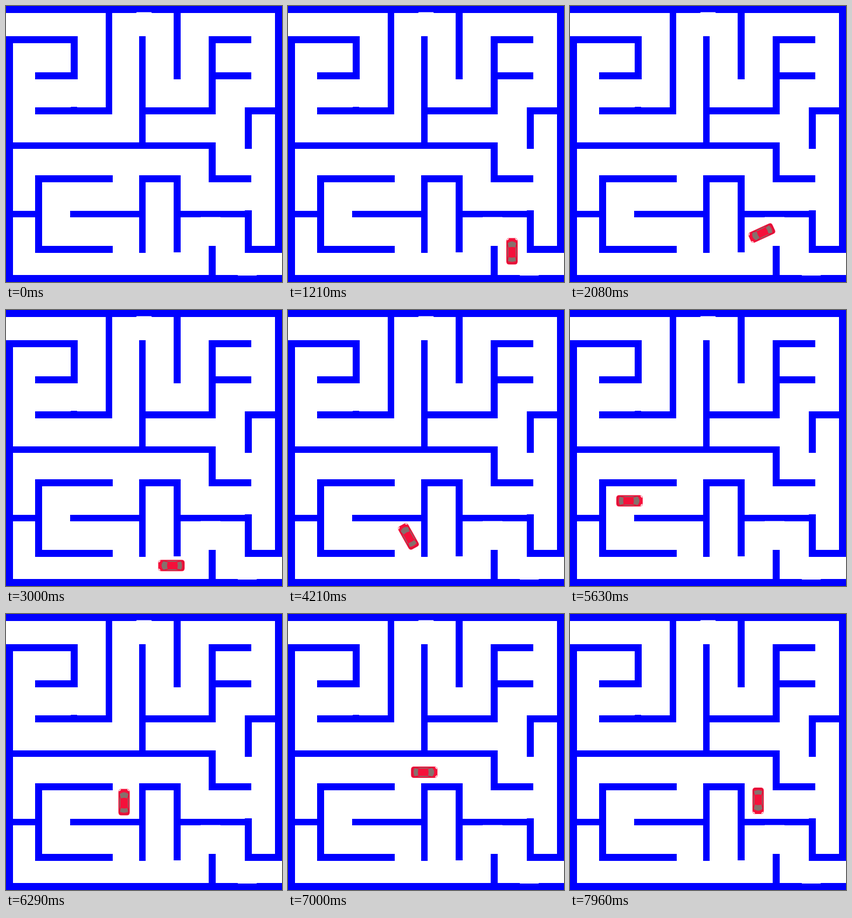
An HTML page without scripts that plays this animation: 512 by 512 pixels, repeating every 8 s.

```html
<!DOCTYPE html>
<html lang="en">
<head>
<meta charset="utf-8">
<title>Car in a maze</title>
<style>
html, body { margin: 0; width: 100%; height: 100%; overflow: hidden; background: #fff; }
svg { display: block; width: 100vw; height: 100vh; }
.walls { fill: none; stroke: #00f; stroke-width: 12.5; }
.car { animation: drive 8s linear infinite, steer 8s linear infinite; }

/* position of the car's centre */
@keyframes drive {
  0% { translate: 544px 479.5px; }
  11% { translate: 435.5px 479.5px; }
  12.6% { translate: 418px 475px; }
  14% { translate: 415.5px 467px; }
  15.125% { translate: 415.5px 455px; }
  18.75% { translate: 415.5px 422px; }
  20.25% { translate: 413px 421.5px; }
  21.375% { translate: 403.5px 421px; }
  25.6% { translate: 356px 421px; }
  27.1% { translate: 355px 422px; }
  31% { translate: 355px 464px; }
  31.75% { translate: 354.5px 471px; }
  32.5% { translate: 351px 473px; }
  37.5% { translate: 307px 474px; }
  42.25% { translate: 259.5px 474px; }
  46.25% { translate: 214px 473px; }
  47.75% { translate: 215px 470px; }
  52.1% { translate: 223px 424px; }
  52.6% { translate: 223.5px 420px; }
  53.75% { translate: 220px 420px; }
  58% { translate: 163px 419px; }
  62.25% { translate: 98px 417px; }
  63.75% { translate: 92.5px 409px; }
  67.5% { translate: 94px 357px; }
  69% { translate: 95px 355px; }
  70.4% { translate: 110.5px 354px; }
  73.5% { translate: 161.5px 354px; }
  76.9% { translate: 216px 353px; }
  78.4% { translate: 219px 351px; }
  83.1% { translate: 219.5px 309px; }
  83.9% { translate: 220.5px 304px; }
  84.6% { translate: 224px 298px; }
  87.5% { translate: 252.5px 293.5px; }
  92.5% { translate: 347px 293.5px; }
  93.9% { translate: 349px 293.5px; }
  100% { translate: 349px 351px; }
}

/* 0deg points up */
@keyframes steer {
  0%, 12.6% { rotate: -90deg; }
  14%, 18.75% { rotate: 0deg; }
  20.25%, 25.6% { rotate: -90deg; }
  27.1%, 31% { rotate: -180deg; }
  32.5%, 46.25% { rotate: -90deg; }
  47.75%, 52.1% { rotate: 0deg; }
  53.75%, 62.25% { rotate: -90deg; }
  63.75%, 67.5% { rotate: 0deg; }
  69%, 76.9% { rotate: 90deg; }
  78.4%, 83.1% { rotate: 0deg; }
  84.6%, 92.5% { rotate: 90deg; }
  93.9%, 100% { rotate: 180deg; }
}
</style>
</head>
<body>
<svg viewBox="0 0 512 512">
  <rect width="512" height="512" fill="#fff"/>
  <g class="walls" shape-rendering="crispEdges">
    <!-- border -->
    <path d="M0 6.25H512M0 505.5H512M6.25 56V512M505.5 0V458"/>
    <!-- upper half -->
    <path d="M0 62.5H133M126.5 56V136M54 129.5H133M191 0V200M54 194.5H197"/>
    <path d="M253 56V265M317.5 0V136M253 194.5H389M382.5 56V200M376 62.5H455M382 129.5H455"/>
    <path d="M443 194.5H512M449.5 188V265"/>
    <!-- lower half -->
    <path d="M0 259H389M382.5 253V327M376 320.5H455"/>
    <path d="M54 320.5H198M60.5 314V458M54 451.5H198M0 386H60M119 386H259"/>
    <path d="M253 314V458M247 320.5H324M317.5 314V457"/>
    <path d="M317 386H456M449.5 379V458M443 451.5H512M382.5 445V512"/>
  </g>
  <!-- uneven wall edges -->
  <path fill="#fff" d="M242 11.5h28v2h-28zM361 391.500h37v2h-37zM430 498h35v2h-35z"/>
  <path fill="#00f" d="M120 187h12v2h-12z"/>

  <g class="car">
    <path fill="#f5103a" d="M-6 -24.500H6Q10.500 -24 10.500 -18V19Q10.500 24.500 5 24.500H-5Q-10.500 24.500 -10.500 19V-18Q-10.500 -24 -6 -24.500Z"/>
    <path fill="none" stroke="#c01838" d="M-8.500 -17V18Q-8.500 22.500 -4 22.500H4Q8.500 22.500 8.500 18V-17"/>
    <path fill="#fff" d="M-9.500 -22l3 -2 1 1 -3.500 3zM9.500 -22l-3 -2 -1 1 3.500 3z"/>
    <g fill="#86706c">
      <path d="M-8 -15Q0 -22 8 -15L6 -7Q0 -9 -6 -7Z"/>
      <path d="M-6 11Q0 12.500 6 11L7.500 18Q0 21.500 -7.500 18Z"/>
      <path d="M-8.500 -10L-7 -5V8L-8.500 13ZM8.500 -10L7 -5V8L8.500 13Z"/>
    </g>
  </g>
</svg>
</body>
</html>
```
